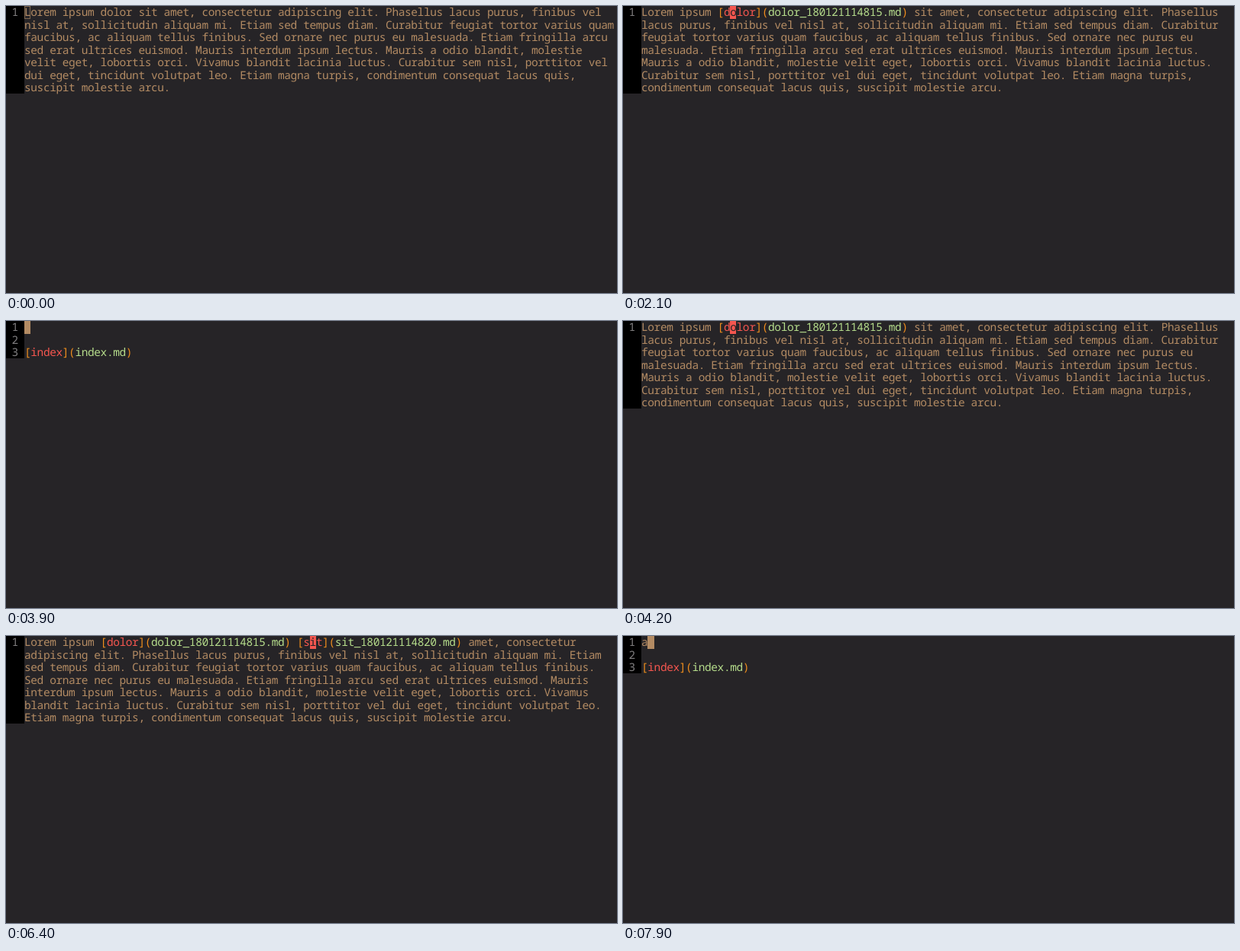
These frames come from a looping animation (800 px wide and 377 px high, 8000 ms). An HTML page:

```html
<!DOCTYPE html>
<html lang="la">
<head>
<meta charset="utf-8">
<title>Linked notes in a text editor</title>
<style>
  html, body { margin: 0; width: 100%; height: 100%; overflow: hidden; background: #262427; }
  #stage {
    position: relative; width: 800px; height: 377px; overflow: hidden;
    font: 14.5px/16.5px "Noto Sans Mono", "DejaVu Sans Mono", monospace;
    text-rendering: geometricPrecision; font-variant-ligatures: none;
    white-space: pre; color: #b38b63;
  }
  #stage div { position: absolute; }
  #gutter { left: 0; top: 0; width: 24px; background: #000; }
  .num { left: 7.4px; color: #817f80; }
  .row { left: 24px; }
  .plain { color: #b38b63; }
  .mark { color: #ee8d1d; }
  .label { color: #f4564f; }
  .path { color: #b5dc8b; }
  .on { color: #262427; }
  #cursor { box-sizing: border-box; height: 16.5px; background: currentColor; }
  #cursor.hollow { background: none; border: 1px solid #80684f; }
</style>
</head>
<body>
<div id="stage"></div>
<script>
const LOOP = 8000, CELL = 8.3, LINE = 16.5, LEFT = 24, COLS = 93;
const stage = document.getElementById("stage");

const head = "Lorem ipsum ";
const tail = " amet, consectetur adipiscing elit. Phasellus lacus purus, finibus vel nisl at, " +
  "sollicitudin aliquam mi. Etiam sed tempus diam. Curabitur feugiat tortor varius quam faucibus, " +
  "ac aliquam tellus finibus. Sed ornare nec purus eu malesuada. Etiam fringilla arcu sed erat " +
  "ultrices euismod. Mauris interdum ipsum lectus. Mauris a odio blandit, molestie velit eget, " +
  "lobortis orci. Vivamus blandit lacinia luctus. Curabitur sem nisl, porttitor vel dui eget, " +
  "tincidunt volutpat leo. Etiam magna turpis, condimentum consequat lacus quis, suscipit molestie arcu.";
const dolor = "[dolor](dolor_180121114815.md)";
const sit = "[sit](sit_180121114820.md)";
const back = "\n\n[index](index.md)";

const pages = {
  bare: head + "dolor sit" + tail,
  one: head + dolor + " sit" + tail,
  two: head + dolor + " " + sit + tail,
  note: back,
  typed: "a" + back
};

// start time, page, cursor column, hollow cursor
const steps = [
  [0, "bare", 0, true], [100, "bare", 0], [400, "bare", 4], [700, "bare", 10], [1000, "bare", 16],
  [2100, "one", 14], [2900, "note", 0], [4200, "one", 14],
  [4800, "one", 17], [5000, "one", 19], [5200, "one", 37], [5400, "one", 38],
  [5450, "one", 40], [5500, "one", 41], [5600, "one", 45],
  [6400, "two", 45], [7200, "note", 0], [7800, "typed", 1]
];

function wrap(line) {
  const rows = [];
  let row = null;
  for (const word of line.split(" ")) {
    if (row !== null && row.length + 1 + word.length > COLS) {
      rows.push(row);
      row = word;
    } else {
      row = row === null ? word : row + " " + word;
    }
  }
  return [...rows, row];
}

function classes(text) {
  const list = Array(text.length).fill("plain");
  for (const m of text.matchAll(/\[(\w+)\]\(([\w.]+)\)/g)) {
    const a = m.index, b = a + 1 + m[1].length, c = b + 2, d = c + m[2].length;
    list.fill("mark", a, d + 1).fill("label", a + 1, b).fill("path", c, d);
  }
  return list;
}

function add(parent, tag, name, text) {
  const el = document.createElement(tag);
  el.className = name;
  el.textContent = text;
  return parent.appendChild(el);
}

function place(name, row, text) {
  const el = add(stage, "div", name, text);
  el.style.top = row * LINE + "px";
  return el;
}

function fillRow(row, text, kinds) {
  const el = place("row", row, "");
  for (let i = 0, j; i < text.length; i = j) {
    for (j = i + 1; j < text.length && kinds[j] === kinds[i];) j++;
    add(el, "span", kinds[i], text.slice(i, j));
  }
}

function draw([, page, col, hollow]) {
  stage.textContent = "";
  const gutter = place("", 0, "");
  gutter.id = "gutter";
  let row = 0;
  pages[page].split("\n").forEach((line, n) => {
    place("num", row, n + 1);
    for (const text of wrap(line)) {
      const kinds = classes(text);
      if (row === 0) {
        const cursor = place(kinds[col] || "plain", 0, "");
        cursor.id = "cursor";
        cursor.style.left = LEFT + col * CELL + "px";
        cursor.style.width = CELL + "px";
        if (hollow) cursor.classList.add("hollow");
        else if (col < text.length) kinds[col] = "on";
      }
      fillRow(row++, text, kinds);
    }
  });
  gutter.style.height = Math.floor(row * LINE) + "px";
}

// Match the font's advance to the terminal cell.
const probe = add(stage, "span", "", "0".repeat(100));
stage.style.letterSpacing = CELL - probe.getBoundingClientRect().width / 100 + "px";

let shown = null;
const start = performance.now();
function tick(now) {
  const t = Math.max(0, now - start) % LOOP;
  const step = steps.findLast(s => s[0] <= t);
  if (step !== shown) draw(shown = step);
  requestAnimationFrame(tick);
}
tick(start);
</script>
</body>
</html>
```
